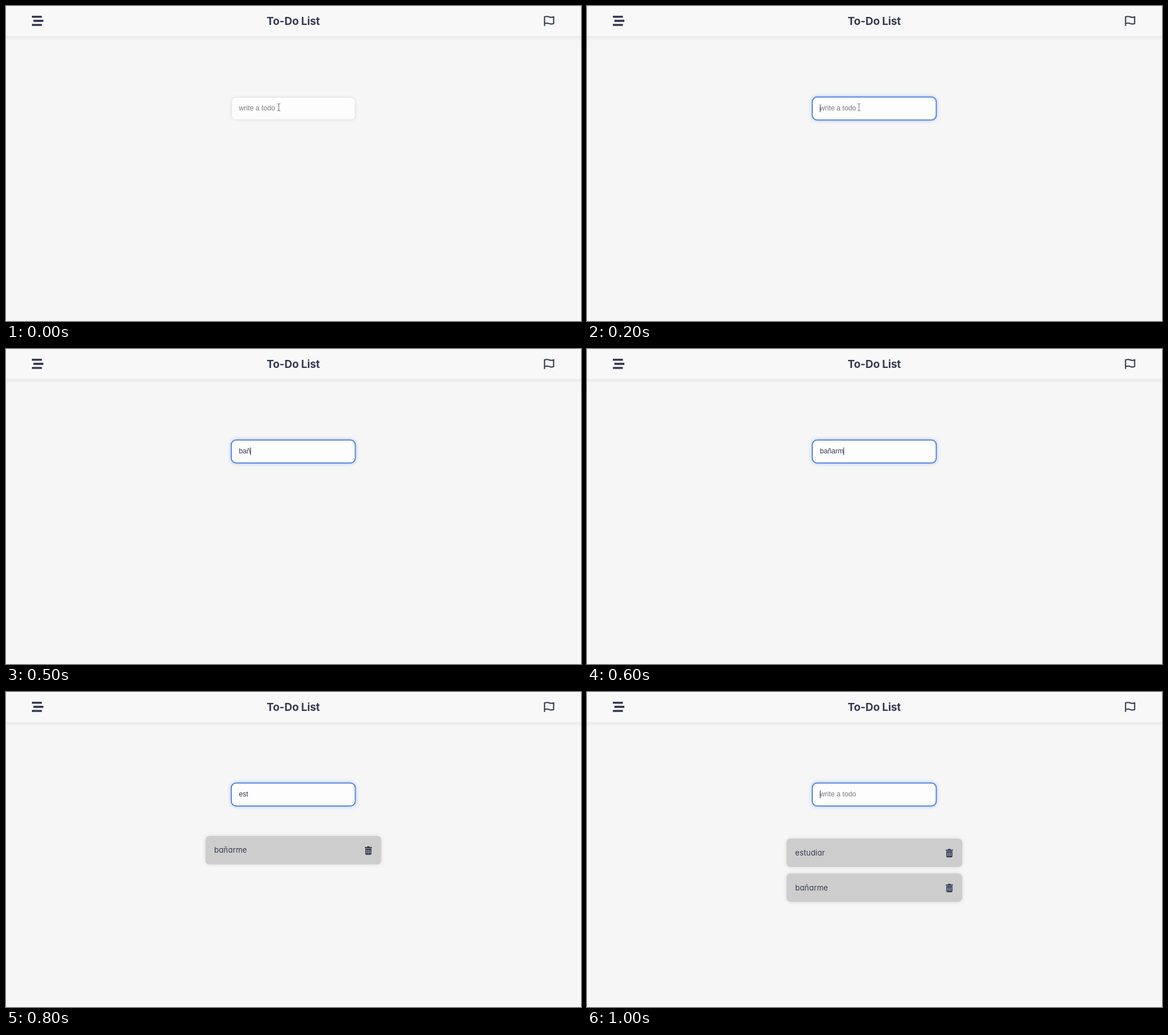
Write an HTML page that moves like this. It is 1000 by 549 pixels and loops after 1.1 s.

```html
<!DOCTYPE html>
<html lang="en">
<head>
<meta charset="utf-8">
<title>To-Do List</title>
<style>
  html, body { margin: 0; width: 100%; height: 100%; overflow: hidden; background: #f6f6f6; }
  svg { display: block; width: 100%; height: 100%; }
  .title { font: 700 18.8px Inter, sans-serif; letter-spacing: -.15px; text-anchor: middle; }
  .entry { font: 12.2px "Liberation Sans", Arial, sans-serif; }
  .label { font: 13.2px Inter, sans-serif; font-feature-settings: "cv11"; letter-spacing: .1px; }
  .ink { fill: #353a52; }
  .line { fill: none; stroke: #353a52; }
  .soft { filter: drop-shadow(0 0 3px rgba(0, 0, 0, .13)); }
  .glow { filter: drop-shadow(0 0 3px rgba(74, 125, 224, .45)); }
  .head { filter: drop-shadow(0 1px 5px rgba(0, 0, 0, .09)); }
</style>
</head>
<body>
<svg viewBox="0 0 1000 549">
  <defs>
    <g id="trash">
      <path class="ink" d="M-6.2 -6.3h3.5l.8-1.2h3.8l.8 1.2h3.5v2h-12.4zM-5.3 -3.5h10.6v8.8q0 1.9-1.9 1.9h-6.8q-1.9 0-1.9-1.9z"/>
      <path d="M-2.8 -1.5v6.5M0 -1.5v6.5M2.8 -1.5v6.5" stroke="#cdcdcd"/>
    </g>
  </defs>
  <rect width="1000" height="549" fill="#f6f6f6"/>
  <rect class="head" x="-20" y="-20" width="1040" height="72.5" fill="#f8f8f8"/>
  <path class="ink" d="M45 17h17.4v3.6h-17.4zM47.6 24.1h17.4v3.6h-17.4zM45 31.2h17.4v3.6h-17.4z"/>
  <text class="title ink" x="499.6" y="33">To-Do List</text>
  <path class="line" stroke-width="2.1" d="M936.6 34.8V19Q941 17.4 944.8 19T952.4 19V30.6Q948.5 32.2 944.8 30.6T936.6 30.6"/>
  <rect id="box"/>
  <text id="entry" class="entry" x="405" y="182.4"></text>
  <path id="caret" class="line" d="M0 171.5v13.5"/>
  <path id="beam" fill="none" stroke="#6c6e78" d="M-2.5 170.5h2l.5.5.5-.5h2M0 171v11M-2.5 182.5h2l.5-.5.5.5h2"/>
  <g id="list"></g>
</svg>
<script>
const $ = id => document.getElementById(id);
const LOOP = 1100, HINT = "write a todo";

// Each step holds until the next one begins.
const steps = [
  { at: 0, beam: 474.5, blurred: true },
  { at: 100, beam: 473 },
  { at: 200, beam: 473, caret: 405.5 },
  { at: 300, text: "bña", caret: 425.5 },
  { at: 500, text: "bañ", caret: 425.5 },
  { at: 600, text: "bañarm", caret: 446.5 },
  { at: 700, items: [["bañarme", 251]] },
  { at: 800, text: "est", items: [["bañarme", 251]] },
  { at: 900, text: "estudi", items: [["bañarme", 251]] },
  { at: 1000, caret: 405.5, items: [["estudiar", 255.5], ["bañarme", 316.3]] }
];

function set(el, attrs) {
  for (const key in attrs) el.setAttribute(key, attrs[key]);
}

function place(el, x) {
  set(el, { visibility: x ? "visible" : "hidden", transform: `translate(${x || 0} 0)` });
}

const item = ([name, y]) => `<g transform="translate(347 ${y})">
  <rect class="soft" width="305.5" height="49.5" rx="7" fill="#cdcdcd"/>
  <text class="label ink" x="15" y="29.3">${name}</text>
  <use href="#trash" x="283.2" y="25.5"/></g>`;

function draw({ text, caret, beam, blurred, items = [] }) {
  set($("box"), blurred
    ? { x: 393, y: 160, width: 213.5, height: 37.5, rx: 7, fill: "#fdfdfd", stroke: "none", class: "soft" }
    : { x: 391.8, y: 158.6, width: 215.6, height: 40, rx: 8.5, fill: "#fdfdfd",
        stroke: "#467be0", "stroke-width": 1.7, class: "glow" });
  $("entry").textContent = text || HINT;
  set($("entry"), { fill: text ? "#353a52" : "#7a7a83" });
  place($("caret"), caret);
  place($("beam"), beam);
  $("list").innerHTML = items.map(item).join("");
}

let shown;
function tick() {
  const t = performance.now() % LOOP;
  const step = steps.findLast(s => s.at <= t);
  if (step !== shown) draw(shown = step);
  requestAnimationFrame(tick);
}
tick();
</script>
</body>
</html>
```
